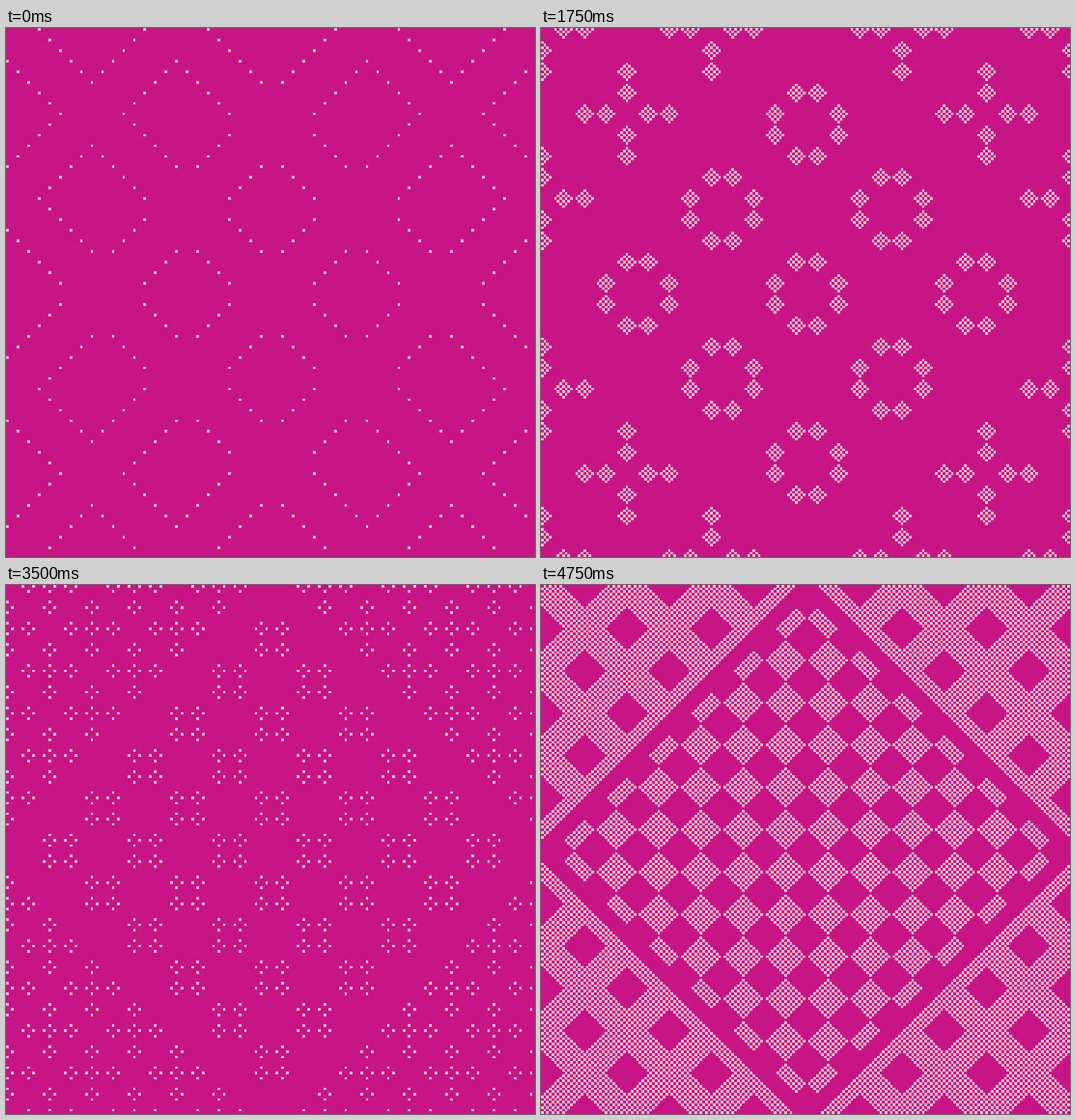
An HTML page with a canvas that plays this animation: 748x748 px, repeating every 5 s.

```html
<!DOCTYPE html>
<html lang="en">
<head>
<meta charset="utf-8">
<title>Parity automaton</title>
<style>
  html, body { margin: 0; width: 100%; height: 100%; overflow: hidden; background: #c71585; }
  canvas { display: block; }
</style>
</head>
<body>
<canvas id="stage" width="748" height="748"></canvas>
<script>
const STAGE = 748, SIZE = 200, STEPS = 20, STEP_MS = 250;
const STRIDE = 8, RING = SIZE / STRIDE;
const ctx = document.getElementById('stage').getContext('2d');

// Seed: sparse lattice, alive where both diagonals have a listed ring distance from 0.
const distances = new Set([2, 3, 4, 5, 6, 10, 11, 12]);
const onDiagonal = k => {
  k = (k + RING) % RING;
  return distances.has(Math.min(k, RING - k));
};

function seed() {
  const cells = new Uint8Array(SIZE * SIZE);
  for (let j = 0; j < RING; j++)
    for (let i = 0; i < RING; i++)
      if (onDiagonal(i + j) && onDiagonal(i - j))
        cells[(j * SIZE + i) * STRIDE] = 1;
  return cells;
}

// Each cell becomes the parity of its four neighbours on a torus.
function evolve(cells) {
  const at = (x, y) => cells[(y + SIZE) % SIZE * SIZE + (x + SIZE) % SIZE];
  return cells.map((_, n) => {
    const x = n % SIZE, y = Math.floor(n / SIZE);
    return at(x - 1, y) ^ at(x + 1, y) ^ at(x, y - 1) ^ at(x, y + 1);
  });
}

const edge = n => Math.round(n * STAGE / SIZE);

function draw(cells) {
  ctx.fillStyle = '#c71585';
  ctx.fillRect(0, 0, STAGE, STAGE);
  ctx.fillStyle = '#ffc0cb';
  cells.forEach((alive, n) => {
    if (!alive) return;
    const x = n % SIZE, y = Math.floor(n / SIZE);
    ctx.fillRect(edge(x), edge(y), edge(x + 1) - edge(x), edge(y + 1) - edge(y));
  });
}

let cells = seed();
for (let i = 0; i < 4; i++) cells = evolve(cells);
const generations = [cells];
while (generations.length < STEPS) generations.push(evolve(generations.at(-1)));

let shown = -1;
const start = performance.now();
function tick() {
  const step = Math.floor((performance.now() - start) / STEP_MS) % STEPS;
  if (step !== shown) draw(generations[shown = step]);
  requestAnimationFrame(tick);
}
tick();
</script>
</body>
</html>
```
